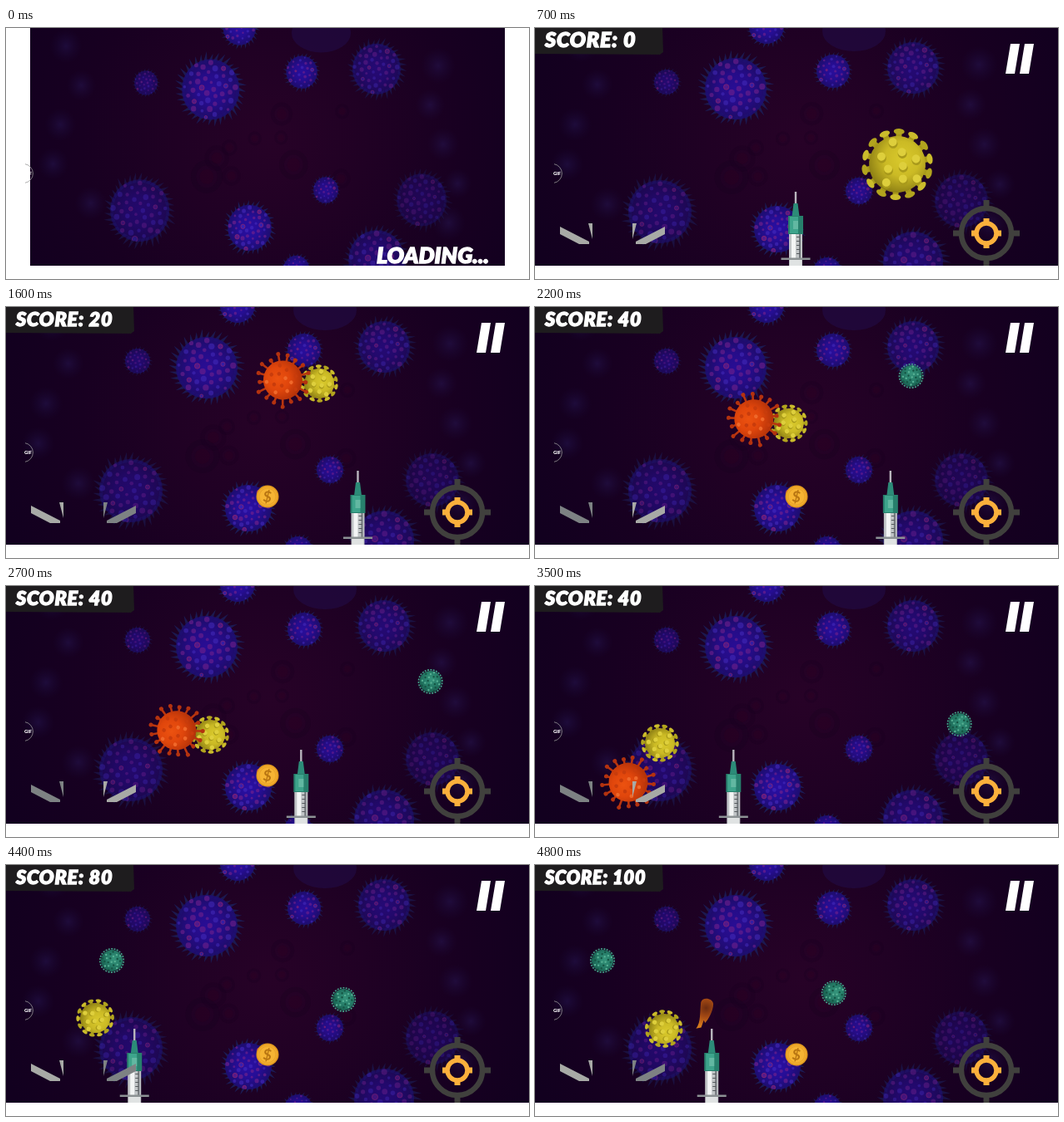
These frames come from a looping animation (628 px wide and 302 px high, 4.9 s). An HTML page with a canvas:

```html
<!DOCTYPE html>
<html lang="en">
<head>
<meta charset="utf-8">
<title>Virus shooter</title>
<style>
  html, body { margin: 0; width: 100%; height: 100%; overflow: hidden; background: #fff; }
  canvas, svg { position: absolute; left: 0; top: 0; display: block; }
  text { font-family: Lato, "Open Sans", sans-serif; font-weight: 900; fill: #fff; }
  .title { font-style: italic; stroke: #fff; stroke-width: 1.3; }
</style>
</head>
<body>
<canvas id="stage" width="628" height="286"></canvas>
<svg width="628" height="302" viewBox="0 0 628 302">
  <g id="hud">
    <path d="M0 0H153L154 29L150 32L0 31Z" fill="#1e1c1e"/>
    <text id="score" class="title" x="12" y="23" letter-spacing=".8"></text>
    <path d="M571 19h11l-6 36h-11zM588 19h11l-6 36h-11z" fill="#fff"/>
    <path id="left" d="M30 239L65 257V260H53L30 248ZM64 235H69V254Z"/>
    <path id="right" d="M156 239L121 257V260H133L156 248ZM122 235H117V254Z"/>
    <svg width="628" height="286" fill="none">
      <g stroke="#40403d">
        <circle cx="542" cy="247" r="30" stroke-width="6.5"/>
        <path d="M542 207v13M542 274v13M502 247h13M569 247h13" stroke-width="7"/>
      </g>
      <g stroke="#fbb03c">
        <circle cx="542" cy="247" r="12" stroke-width="5.5"/>
        <path d="M542 229v6M542 259v6M524 247h6M554 247h6" stroke-width="7"/>
      </g>
    </svg>
  </g>
  <text id="loading" class="title" x="445" y="283" font-size="27">LOADING...</text>
  <path d="M23 163.7A11.5 11.5 0 0 1 23 186.3" fill="none" stroke="#999" stroke-width=".8"/>
  <text x="22" y="177" font-size="5.5">GIF</text>
</svg>
<script>
const W = 628, H = 286, LOOP = 4900, START = 300, TAU = Math.PI * 2;
const $ = id => document.getElementById(id);
const stage = $("stage").getContext("2d");

function seeded(seed) {
  return () => (seed = (seed * 16807) % 2147483647) / 2147483647;
}

function disc(c, x, y, r, fill) {
  c.fillStyle = fill;
  c.beginPath();
  c.arc(x, y, r, 0, TAU);
  c.fill();
}

function ring(c, x, y, r, stroke, width) {
  c.strokeStyle = stroke;
  c.lineWidth = width;
  c.beginPath();
  c.arc(x, y, r, 0, TAU);
  c.stroke();
}

function poly(c, points, fill) {
  c.fillStyle = fill;
  c.beginPath();
  points.forEach(p => c.lineTo(...p));
  c.fill();
}

function glow(c, x, y, r, ...colors) {
  const g = c.createRadialGradient(x, y, 0, x, y, r);
  colors.forEach((col, i) => g.addColorStop(i / (colors.length - 1), col));
  return g;
}

// Calls put(x, y, i, distance) for n points spread evenly over a disc.
function scatter(n, radius, put) {
  for (let i = 0; i < n; i++) {
    const d = Math.sqrt((i + .5) / n) * radius, a = i * 2.4;
    put(Math.cos(a) * d, Math.sin(a) * d, i, d);
  }
}

function around(c, n, draw) {
  for (let i = 0; i < n; i++) {
    c.save();
    c.rotate(i / n * TAU);
    draw(i);
    c.restore();
  }
}

// --- Backdrop -------------------------------------------------------------

// x, y, radius
const CELLS = [[241, 73, 37], [358, 52, 20], [454, 48, 31], [158, 65, 15], [150, 221, 38],
  [291, 242, 28], [389, 196, 16], [512, 208, 32], [454, 281, 36], [278, -2, 21], [351, 293, 17]];

// Cells fade with their distance from the middle of the stage.
function cell(c, x, y, r, seed) {
  const rnd = seeded(seed * 977 + 31);
  c.save();
  c.translate(x, y);
  c.rotate(seed);
  c.globalAlpha = Math.max(.35, 1 - (Math.abs(x - 310) / 290) ** 1.4);
  around(c, Math.round(14 + r * .6), () => {
    const tip = r * (1.14 + rnd() * .14);
    poly(c, [[r * .9, -r * .07], [tip, r * .14], [r * .9, r * .08]], "#1c1d56");
  });
  disc(c, 0, 0, r, glow(c, 0, 0, r, "#2a0fa6", "#260e98", "#1d0d70"));
  c.clip();
  c.rotate(-seed);
  scatter(r > 25 ? 42 : 26, r * .95, (px, py, i) => {
    const s = r * (.05 + rnd() * .05);
    const warm = rnd() < .55 - py / r * .25;
    disc(c, px, py, s, warm ? "rgba(112,32,140,.7)" : "rgba(70,44,190,.6)");
    if (i % 9 == 4) ring(c, px, py, s, "rgba(140,36,110,.8)", 1);
  });
  c.restore();
}

function makeBackdrop(sx, sy) {
  const cv = document.createElement("canvas"), rnd = seeded(4211);
  cv.width = W;
  cv.height = H;
  const c = cv.getContext("2d");
  c.fillStyle = glow(c, 320, 135, 340, "#270227", "#200124", "#180021", "#12001f");
  c.fillRect(0, 0, W, H);
  c.translate(314, 130);
  c.scale(sx, sy);
  c.translate(-314, -130);
  for (let i = 0; i < 10; i++) {
    const x = 230 + rnd() * 180, y = 80 + rnd() * 110, r = 9 + rnd() * 16;
    ring(c, x, y, r * .75, "rgba(18,0,28,.2)", r * .3);
    disc(c, x, y, r * .4, "rgba(56,0,32,.2)");
  }
  for (let i = 0; i < 10; i++) {
    const x = 30 + i % 2 * 490 + rnd() * 70, y = 20 + i * 24, r = 18 + rnd() * 5;
    disc(c, x, y, r, glow(c, x, y, r, "rgba(50,38,120,.3)", "rgba(30,20,80,0)"));
  }
  c.fillStyle = "rgba(34,14,78,.5)";
  c.beginPath();
  c.ellipse(383, 4, 38, 24, 0, 0, TAU);
  c.fill();
  CELLS.forEach((v, i) => cell(c, ...v, i + 1));
  return cv;
}

const gameBack = makeBackdrop(1, 1), loadBack = makeBackdrop(.935, .985);

// --- Sprites --------------------------------------------------------------

function stalk(c, from, to, width, color) {
  c.strokeStyle = color;
  c.lineWidth = width;
  c.beginPath();
  c.moveTo(from, 0);
  c.lineTo(to, 0);
  c.stroke();
}

function redVirus(c) {
  around(c, 17, i => {
    const end = 30 + Math.sin(i * 2.3) * 2.5;
    stalk(c, 20, end, 2.6, "#b9350f");
    disc(c, end, 0, 2.5, "#b3320f");
  });
  disc(c, 0, 0, 23.5, glow(c, -4, -5, 28, "#ec5210", "#e0460c", "#b63309"));
  scatter(13, 20, (x, y, i) => disc(c, x, y, 2.3, i % 3 ? "#c83c0c" : "#f0682a"));
}

function yellowVirus(c) {
  around(c, 14, i => {
    stalk(c, 28, 39, 7, "#a99a1a");
    c.fillStyle = i % 2 ? "#cbbc2c" : "#b2a41e";
    c.beginPath();
    c.ellipse(39.5, 0, 3.5, 6.5, 0, 0, TAU);
    c.fill();
  });
  disc(c, 0, 0, 34, glow(c, 4, -8, 42, "#d9c92c", "#cbba25", "#8e8014"));
  scatter(9, 30, (x, y) => {
    disc(c, x + 1, y + 2, 5.5, "#a99a1b");
    disc(c, x, y, 5, "#decf3c");
  });
}

function greenVirus(c) {
  c.setLineDash([2, 1.4]);
  ring(c, 0, 0, 14.2, "#45a58b", 1.6);
  c.setLineDash([]);
  disc(c, 0, 0, 13, glow(c, -2, -2, 15, "#35947b", "#28806b", "#1a6252"));
  scatter(22, 12, (x, y, i) => disc(c, x, y, 1.2, i % 2 ? "#155443" : "#56b093"));
}

function bullet(c) {
  c.rotate(.12);
  c.fillStyle = glow(c, 0, -6, 22, "#6d2c10", "#a54a14", "#d47a1d");
  c.beginPath();
  c.moveTo(-7, -12);
  c.bezierCurveTo(-6, -19, 6, -19, 8, -12);
  c.bezierCurveTo(9, -3, 4, 8, 1, 12);
  c.lineTo(-1, 9);
  c.lineTo(-3, 18);
  c.lineTo(-9, 20);
  c.bezierCurveTo(-4, 12, -7, 0, -7, -12);
  c.fill();
}

function coin(c) {
  disc(c, 0, 0, 13.5, "#e39a20");
  disc(c, 0, 0, 11.5, "#f6b433");
  ring(c, 0, 0, 10, "#e9a328", 1.2);
  c.rotate(.15);
  c.fillStyle = "#b87512";
  c.font = "bold 18px Lato, sans-serif";
  c.textAlign = "center";
  c.textBaseline = "middle";
  c.fillText("$", 0, 1);
}

function syringe(c) {
  const bar = (y, w, h, fill, x = -w / 2) => { c.fillStyle = fill; c.fillRect(x, y, w, h); };
  bar(197, 2.4, 16, "#b9b6bd");
  poly(c, [[-2.5, 211], [2.5, 211], [4.5, 227], [-4.5, 227]], "#2c8b78");
  bar(226, 18, 22, "#277f6c");
  bar(227, 10, 20, "#3ea48c", -7);
  bar(232, 6, 10, "#62b8a2");
  bar(248, 16, 38, "#c0c4c6");
  bar(248, 5, 38, "#f3f5f5", -5);
  bar(248, 2, 38, "#70757a", 4);
  for (let y = 251; y < 275; y += 5) bar(y, 4, 1, "#53585c", 1);
  bar(276.5, 35, 2.5, "#8c9294");
  bar(279, 14, 7, "#e0e3e3");
}

function sprite(draw, x, y, scale = 1, turn = 0) {
  stage.save();
  stage.translate(x, y);
  stage.rotate(turn);
  stage.scale(scale, scale);
  draw(stage);
  stage.restore();
}

// --- Timeline -------------------------------------------------------------

const GO = 845, TURN_LEFT = 1915, TURN_RIGHT = 4240;
const SHOTS = [1200, 2000, 4000, 4200, 4500, 4700], FLIGHT = 200;
const [SPLIT, SPAWN, BURST] = SHOTS.map(s => s + FLIGHT);

const spent = (t, from, to) => Math.max(0, Math.min(t, to) - from);
const sway = (t, peak, half) => Math.cos((t - peak) / half * Math.PI);

const syringeX = t => 313 + .145 *
  (spent(t, GO, TURN_LEFT) - spent(t, TURN_LEFT, TURN_RIGHT) + spent(t, TURN_RIGHT, LOOP));

// Each virus drifts at a steady speed and turns back at a wall.
const bigPath = t => [435 - .09 * (t - 700), 164 - .114 * (t - 700)];
const yellowPath = t => [75 + .119 * Math.abs(t - 4130),
  Math.min(92 + .08 * (t - 1600), 184 + 13 * sway(t, 4800, 800))];
const redPath = t => [90 + .116 * Math.abs(t - 3690),
  240 - Math.max(.078 * (3550 - t), .21 * (t - 3550))];
const greenPath = t => [556 - .116 * Math.abs(t - 3100),
  Math.min(115 + .064 * (t - 2700), 154 + 12 * sway(t, 3500, 520))];
const burstPath = t => [150 - .115 * (t - BURST), 115];

function drawLoading() {
  stage.drawImage(loadBack, 0, 0);
  stage.clearRect(0, 0, 29, H);
  stage.clearRect(599, 0, 29, H);
}

function drawGame(t) {
  const spin = t / 2500;
  stage.drawImage(gameBack, 0, 0);
  if (t >= SPLIT && t < 2900 || t > BURST) sprite(coin, 314, 228);

  if (t < SPLIT) sprite(yellowVirus, ...bigPath(t), 1, spin);
  else sprite(yellowVirus, ...yellowPath(t), .53, spin);
  if (t >= SPLIT && t < BURST) sprite(redVirus, ...redPath(t), 1, -spin);
  if (t >= SPAWN) sprite(greenVirus, ...greenPath(t), 1, spin);
  if (t >= BURST) sprite(greenVirus, ...burstPath(t), 1, spin);

  sprite(syringe, syringeX(t), 0);
  SHOTS.filter(s => t >= s && t < s + FLIGHT).forEach(s =>
    sprite(bullet, syringeX(s) + 7, 262 - (t - s) * .84));

  const score = 20 * SHOTS.filter(s => t >= s + FLIGHT).length;
  $("score").textContent = "SCORE: " + score;
  $("score").setAttribute("font-size", 27 - 1.8 * String(score).length);

  const goLeft = t >= TURN_LEFT && t < TURN_RIGHT, goRight = t >= GO && !goLeft;
  const shade = pressed => pressed ? "#7d8283" : "#a8aaa6";
  $("left").setAttribute("fill", shade(goLeft));
  $("right").setAttribute("fill", shade(goRight));
}

function frame(now) {
  const t = Math.floor((now % LOOP) / 100) * 100;
  const playing = t >= START;
  $("hud").style.display = playing ? "" : "none";
  $("loading").style.display = playing ? "none" : "";
  if (playing) drawGame(t);
  else drawLoading();
  requestAnimationFrame(frame);
}

frame(0);
</script>
</body>
</html>
```
